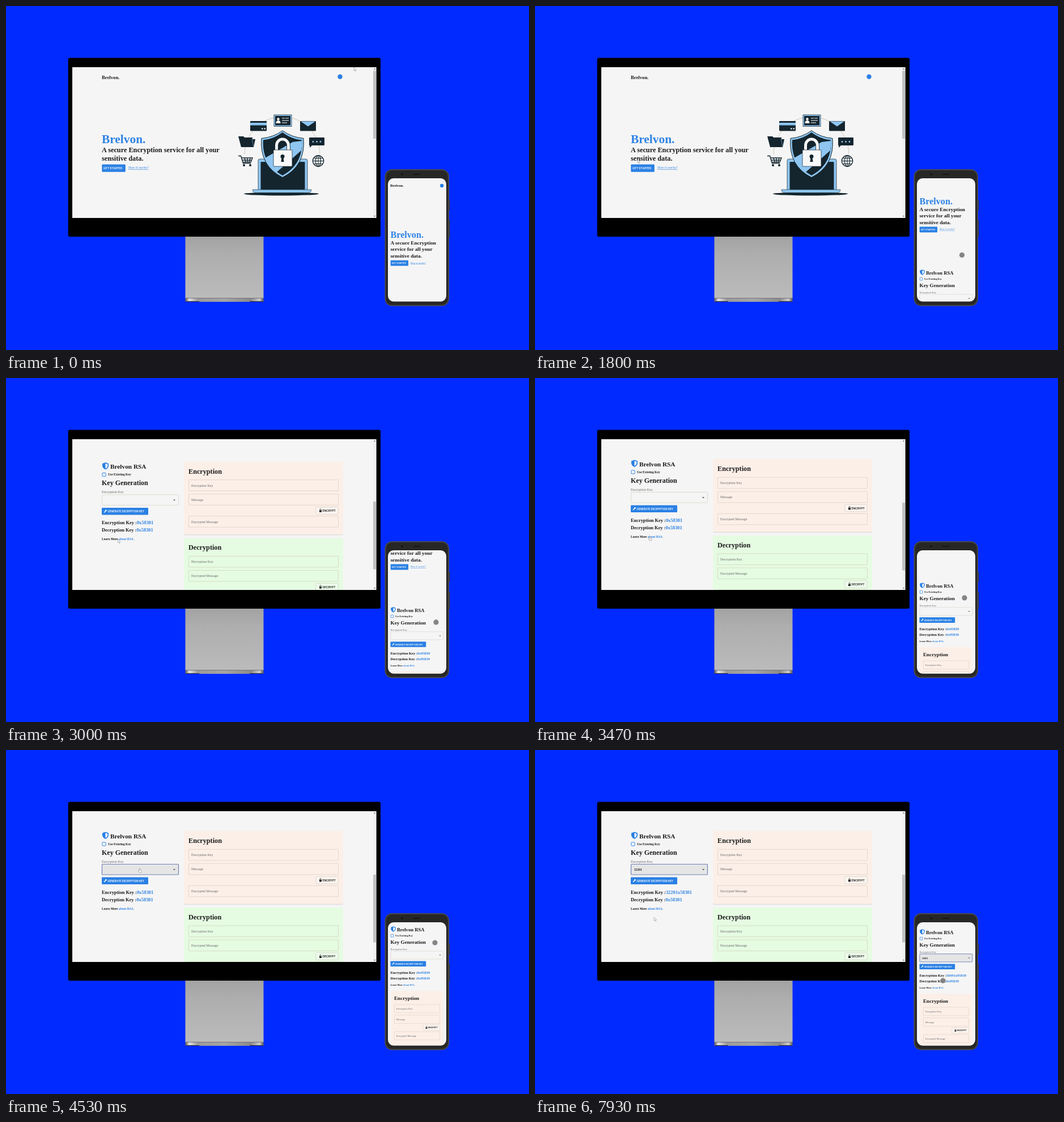
Animation of 923x607 px, one loop 8 s. Source, as an HTML page:

```html
<!DOCTYPE html>
<html lang="en">
<head>
<meta charset="utf-8">
<title>Encryption service on two devices</title>
<style>
  html, body { margin: 0; width: 100%; height: 100%; overflow: hidden; background: #002aff; }
  svg { display: block; width: 100vw; height: 100vh; }
  text { font-family: "Liberation Serif", "Noto Serif", serif; white-space: pre; fill: #1b1b1b; }
  .bold { font-weight: 700; }
  .caps { font-family: Roboto, Arial, sans-serif; font-weight: 500; }
  .blue { fill: #2f83e4; }
  .white { fill: #fff; }
  .grey { fill: #666; }
  .field { fill: none; stroke: #b9a98f; stroke-opacity: .45; stroke-width: .8; }
  .field.focused { fill: #e5e5e6; stroke: #7181b4; stroke-opacity: 1; stroke-width: 1.2; }
</style>
</head>
<body>
<svg id="stage" viewBox="0 0 923 607"></svg>
<script>
const LOOP = 8000;
const NAME = 'Brelvon';
const BLUE = '#2a80e4', DARK = '#14252e', SKY = '#8fc6f1', PAGE = '#f5f5f5';
const stage = document.getElementById('stage');

const text = (x, y, size, content, cls = 'bold', extra = '') =>
  `<text x="${x}" y="${y}" font-size="${size}" class="${cls}" ${extra}>${content}</text>`;
const rect = (x, y, w, h, fill, r = 0, extra = '') =>
  `<rect x="${x}" y="${y}" width="${w}" height="${h}" rx="${r}" fill="${fill}" ${extra}/>`;
const path = (d, fill, extra = '') => `<path d="${d}" fill="${fill}" ${extra}/>`;
const line = (d, color, width) => path(d, 'none', `stroke="${color}" stroke-width="${width}"`);
const circle = (x, y, r, fill, extra = '') => `<circle cx="${x}" cy="${y}" r="${r}" fill="${fill}" ${extra}/>`;
const place = (x, y, scale, content) => `<g transform="translate(${x} ${y}) scale(${scale})">${content}</g>`;

// Origin: left end of the title's baseline.
function hero(lines) {
  const top = 16 + 15 * (lines.length - 1) + 6.5;
  return text(0, 0, 21.4, NAME + '.', 'bold blue')
    + lines.map((s, i) => text(0, 16 + 15 * i, 12.26, s)).join('')
    + rect(.3, top, 41.5, 13.2, BLUE, 1)
    + text(3, top + 8.4, 5.3, 'GET STARTED', 'caps white')
    + text(47, top + 7.8, 6.1, 'How it works?', 'blue', 'font-style="italic" text-decoration="underline"');
}

// Origin: left end of the heading's baseline.
function keyForm(id, selectWidth, suffix) {
  const caret = selectWidth - 7;
  return path('M6.5-11.5L12-9.5V-5Q11-1 6.5 1Q2-1 1-5V-9.5Z', BLUE)
    + path('M6.5-9.7L10.3-8.2V-5Q9.5-2.2 6.5-.8Z', '#fff')
    + text(15, 0, 11.3, NAME + ' RSA')
    + rect(1, 7, 6, 6, '#fff', .5, `stroke="${BLUE}"`)
    + text(11, 12, 5.6, 'Use Existing Key')
    + text(0, 29, 12, 'Key Generation')
    + text(0, 43, 6.1, 'Encryption Key', 'grey')
    + `<rect id="${id}Select" class="field" x=".5" y="45.5" width="${selectWidth}" height="18.5" rx="1"/>`
    + path(`M${caret - 2} 54h4l-2 2.3z`, '#555')
    + text(6, 57, 5.5, '', 'bold', `id="${id}Value"`)
    + rect(0, 68.5, 82, 12.5, BLUE, 1)
    + line('M4 77l3.2-3.2', '#fff', 1.4) + circle(7.4, 73.4, 1.4, '#fff')
    + text(10.5, 76.6, 4.85, 'GENERATE DECRYPTION KEY', 'caps white')
    + text(0, 98, 8.4, `Encryption Key :<tspan class="blue" id="${id}Result">0${suffix}</tspan>`)
    + text(0, 111, 8.4, `Decryption Key :<tspan class="blue">0${suffix}</tspan>`)
    + text(0, 126, 5.5, 'Learn More <tspan class="blue">about RSA.</tspan>');
}

// Origin: top left corner of the card.
function card(width, fill, title, labels, action) {
  const right = width - 9;
  const fields = [32, 57, 96].map((y, i) =>
    `<rect class="field" x="8.5" y="${y}" width="${right - 8}" height="19.5" rx="1"/>`
    + text(13, y + 12, 6.05, labels[i], 'grey')).join('');
  return rect(0, 1, width, 128.5, '#000', 2, 'opacity=".13"')
    + rect(0, 0, width, 128.5, fill, 2)
    + text(8, 21, 12.2, title) + fields
    + rect(right - 39, 80, 39, 12.5, '#fff', 1, 'fill-opacity=".35" stroke="#c9c4bd" stroke-width=".6"')
    + rect(right - 33, 85.5, 4, 3.6, '#222', .4)
    + line(`M${right - 32.2} 85.5v-1q0-1.3 1.2-1.3t1.2 1.3v1`, '#222', .7)
    + text(right - 27.5, 88.3, 5.3, action, 'caps');
}
const encryptCard = width => card(width, '#fcefe8', 'Encryption',
  ['Encryption Key', 'Message', 'Encrypted Message'], 'ENCRYPT');
const decryptCard = width => card(width, '#e5fbe2', 'Decryption',
  ['Decryption Key', 'Encrypted Message', 'Message'], 'DECRYPT');

function illustration() {
  const orbit = line('M421 262A66.5 66.5 0 0 1 554 262', '#b9b29c', .7);
  const idCard = rect(473, 192, 31, 20.5, SKY, 0, `stroke="${DARK}" stroke-width=".7"`) + rect(475, 194, 27, 16.5, DARK)
    + circle(480.5, 199.5, 2.2, '#fff') + path('M476.5 207q0-5 4-5t4 5z', '#fff')
    + line('M487 198h5m1 0h6M487 202h12M487 206h9', '#fff', 1);
  const bankCard = rect(431, 203, 29, 17.5, DARK, 1) + rect(431, 206, 29, 4.5, SKY)
    + line('M451 216.5h2.5m2 0h2.5', '#fff', 2);
  const envelope = rect(519, 203, 28, 17.5, DARK, 1) + path('M520 203.5h26l-13 9z', SKY);
  const folder = path('M410 230h9l2 2h14v3h5l-3 14h-22z', DARK) + line('M434 234l3 14', SKY, .6);
  const chat = path('M536 232h25q1 0 1 1v12q0 1-1 1h-21l-4 4v-4q-1 0-1-1v-12q0-1 1-1z', DARK)
    + [542, 548.5, 555].map(x => circle(x, 239.5, 1.4, SKY)).join('');
  const cart = line('M410 264.5h4.5l4 13h13.5M416 268h19l-3 7.5h-14M421 268l2 7.5M426 268v7.5M431 268l-2 7.5M417 272h17', DARK, 1.4)
    + circle(420, 281, 2, DARK) + circle(431, 281, 2, DARK);
  const globe = circle(551, 273.5, 9.7, 'none', `stroke="${DARK}" stroke-width="1.4"`)
    + `<ellipse cx="551" cy="273.5" rx="4.5" ry="9.7" fill="none" stroke="${DARK}" stroke-width="1.2"/>`
    + line('M551 264v19M541.5 273.5h19M543 268.5h16M543 278.5h16', DARK, 1.1);
  const laptop = `<ellipse cx="486" cy="331.5" rx="66" ry="3" fill="${DARK}"/>`
    + rect(445, 270, 87, 56, SKY, 3, `stroke="${DARK}" stroke-width=".7"`) + rect(449.5, 275, 78, 49, DARK, 1)
    + path('M435 324h104q0 5-6 5.5h-92q-6-.5-6-5.5z', SKY, `stroke="${DARK}" stroke-width=".6"`);
  const shield = path('M488 220Q471 232 451 233.5Q447 282 488 302.5Q529 282 525 233.5Q505 232 488 220Z', SKY, `stroke="${DARK}"`)
    + path('M488 223Q472 235 454 236.5Q451 279 488 299Q525 279 522 236.5Q504 235 488 223Z', DARK)
    + path('M506 240L522 238Q522.5 248 521 255L478 293Q463 283 457.5 268Z', SKY);
  const shackle = 'M477.5 255v-9a10.5 11 0 0 1 21 0v9';
  const padlock = line(shackle, DARK, 6.6) + line(shackle, '#f5f5f5', 5)
    + rect(472, 254, 33, 29, '#f8f8f8', 1, `stroke="${DARK}" stroke-width=".7"`)
    + circle(488, 265.5, 3.5, DARK) + path('M486.6 267h2.8l1.2 8h-5.2z', DARK);
  return orbit + idCard + bankCard + envelope + folder + chat + cart + globe + laptop + shield + padlock;
}

const desktopPage = text(169, 128.5, 8.7, NAME + '.') + circle(589.5, 124.8, 4.2, BLUE)
  + place(169, 242, 1, hero(['A secure Encryption service for all your', 'sensitive data.']))
  + illustration()
  + place(169, 391, 1, keyForm('desk', 135, 'x58301'))
  + place(314, 378.3, 1, encryptCard(281))
  + place(314, 513, 1, decryptCard(281));

const phonePage = text(678, 319, 6.6, NAME + '.') + circle(769.2, 317, 3.2, BLUE)
  + place(678.5, 409, .755, hero(['A secure Encryption', 'service for all your', 'sensitive data.']))
  + place(678.5, 533, .765, keyForm('phone', 121.5, 'x95839'))
  + place(679, 638, .75, encryptCard(124));

const gradient = (id, vertical, stops) =>
  `<linearGradient id="${id}" ${vertical ? 'x2="0" y2="1"' : ''}>`
  + stops.map(([at, color]) => `<stop offset="${at}" stop-color="${color}"/>`).join('') + '</linearGradient>';

stage.innerHTML = `<defs>
  ${gradient('stand', true, [[0, '#a2a2a2'], [.3, '#aeaeae'], [1, '#bcbbbc']])}
  ${gradient('foot', false, [[0, '#555'], [.05, '#e2e2e2'], [.16, '#9a9a9a'], [.5, '#a5a5a5'], [.84, '#8a8a8a'], [.95, '#ccc'], [1, '#555']])}
  <clipPath id="deskClip">${rect(117, 108, 536.5, 266, '#000')}</clipPath>
  <clipPath id="phoneClip">${rect(674, 304, 103, 217.5, '#000', 10)}</clipPath>
</defs>
${rect(0, 0, 923, 607, '#002aff')}
${rect(316.5, 406, 138, 110, 'url(#stand)')}
${rect(316.5, 515, 138, 7, 'url(#foot)', 1)}
${line('M316.5 515.5h138', '#777', 1)}${line('M318 521.5h23M430 521.5h23', '#222', 1)}
${rect(109.7, 91.5, 551.3, 315.5, '#000', 3)}
${rect(117, 108, 536.5, 266, PAGE)}
<g clip-path="url(#deskClip)">
  <g id="deskPage">${desktopPage}</g>
  ${rect(648, 108, 5.5, 266, '#f0f0f0')}
  <g id="thumb">${rect(648, 114.5, 5, 119.5, '#c2c2c2')}</g>
  ${path('M649 112h3l-1.5-2zM649 370h3l-1.5 2z', '#666')}
  <g id="cursor">
    <path id="arrow" d="M0 0V6.2L1.5 4.9L2.6 7.2L3.6 6.7L2.6 4.5H4.4Z" fill="#fff" stroke="#777" stroke-width=".5"/>
    <path id="hand" d="M0 0Q1.2-.6 1.4.5V2.7L4 3.3Q4.6 3.6 4.3 5L3.6 7H.4L-1.5 4.3Q-1.4 3.4 0 4.3Z" fill="#fff" stroke="#666" stroke-width=".5"/>
    <path id="beam" d="M-1 0H1M0 0V6M-1 6H1" fill="none" stroke="#666" stroke-width=".6"/>
  </g>
</g>
${rect(781, 342, 2.3, 18, '#3a3a3a', 1)}${rect(781, 377, 2.3, 31, '#3a3a3a', 1)}
${rect(669, 288.5, 112.5, 240.5, '#393836', 12, 'stroke="#55524c"')}
${rect(671, 290.5, 108.5, 236.5, '#272726', 10.5)}
${circle(699, 297, 2.8, '#151515', 'stroke="#3d3d3d" stroke-width=".6"')}
${line('M719 297h12', '#111', 1.4)}
${rect(674, 304, 103, 217.5, PAGE, 10)}
<g clip-path="url(#phoneClip)"><g id="phonePage">${phonePage}</g></g>
${circle(0, 0, 4.6, '#7b7b7b', 'id="touch" opacity=".92"')}`;

// Each key is [time, value, ...]; eased tracks rest at every key.
function sample(keys, t, eased = true) {
  const next = keys.findIndex(key => key[0] > t);
  if (next < 0) return keys[keys.length - 1].slice(1);
  if (next === 0) return keys[0].slice(1);
  const a = keys[next - 1], b = keys[next];
  let p = (t - a[0]) / (b[0] - a[0]);
  if (eased) p *= p * (3 - 2 * p);
  return a.slice(1).map((v, i) => v + (b[i + 1] - v) * p);
}

const cursorKeys = [[250, 614, 108], [1150, 170, 251], [1400, 170, 251], [2200, 192, 290], [2600, 192, 290],
  [3350, 202, 280], [3550, 202, 280], [4350, 235, 209], [5000, 235, 209], [5800, 232, 221], [6300, 232, 221], [7800, 210, 295]];
const deskScrollKeys = [[2450, 0], [3050, 235]];
const phoneScrollKeys = [[1230, 0], [1270, 3], [2330, 115], [2450, 119], [3000, 120],
  [3470, 163], [4530, 213], [4800, 213], [5400, 208]];
const touches = [
  [[1230, 751, 498], [1270, 751, 495], [2330, 756, 384], [2450, 756, 380]],
  [[3000, 759, 431], [3470, 758, 388], [4530, 757, 340], [4700, 757, 340]],
  [[5600, 708, 334], [6100, 708, 334], [6600, 725, 368], [7100, 725, 368], [7800, 720, 407], [8000, 720, 407]]
];

const $ = id => document.getElementById(id);
const move = (id, x, y) => $(id).setAttribute('transform', `translate(${x} ${y})`);
const show = (id, on) => $(id).setAttribute('visibility', on ? 'visible' : 'hidden');

function setForm(id, focused, chosen, key, suffix) {
  $(id + 'Select').classList.toggle('focused', focused);
  $(id + 'Value').textContent = chosen ? key : '';
  $(id + 'Result').textContent = (chosen ? key : '0') + suffix;
}

function draw(now) {
  const t = now % LOOP;
  const [scroll] = sample(deskScrollKeys, t);
  move('deskPage', 0, -scroll);
  move('thumb', 0, scroll * 105.5 / 235);
  move('phonePage', 0, -sample(phoneScrollKeys, t, false)[0]);

  move('cursor', ...sample(cursorKeys, t));
  const beam = t > 1050 && t < 1700;
  const hand = (t > 2000 && t < 2700) || (t > 3200 && t < 3650) || (t > 4200 && t < 5500);
  show('beam', beam);
  show('hand', hand);
  show('arrow', !beam && !hand);

  const touch = touches.find(keys => t >= keys[0][0] && t <= keys[keys.length - 1][0]);
  show('touch', touch);
  if (touch) move('touch', ...sample(touch, t, false));

  setForm('desk', t >= 4400, t >= 6900, '32201', 'x58301');
  setForm('phone', t >= 6600, t >= 7100, '58491', 'x95839');
}

const start = performance.now();
(function frame() {
  draw(performance.now() - start);
  requestAnimationFrame(frame);
})();
</script>
</body>
</html>
```
